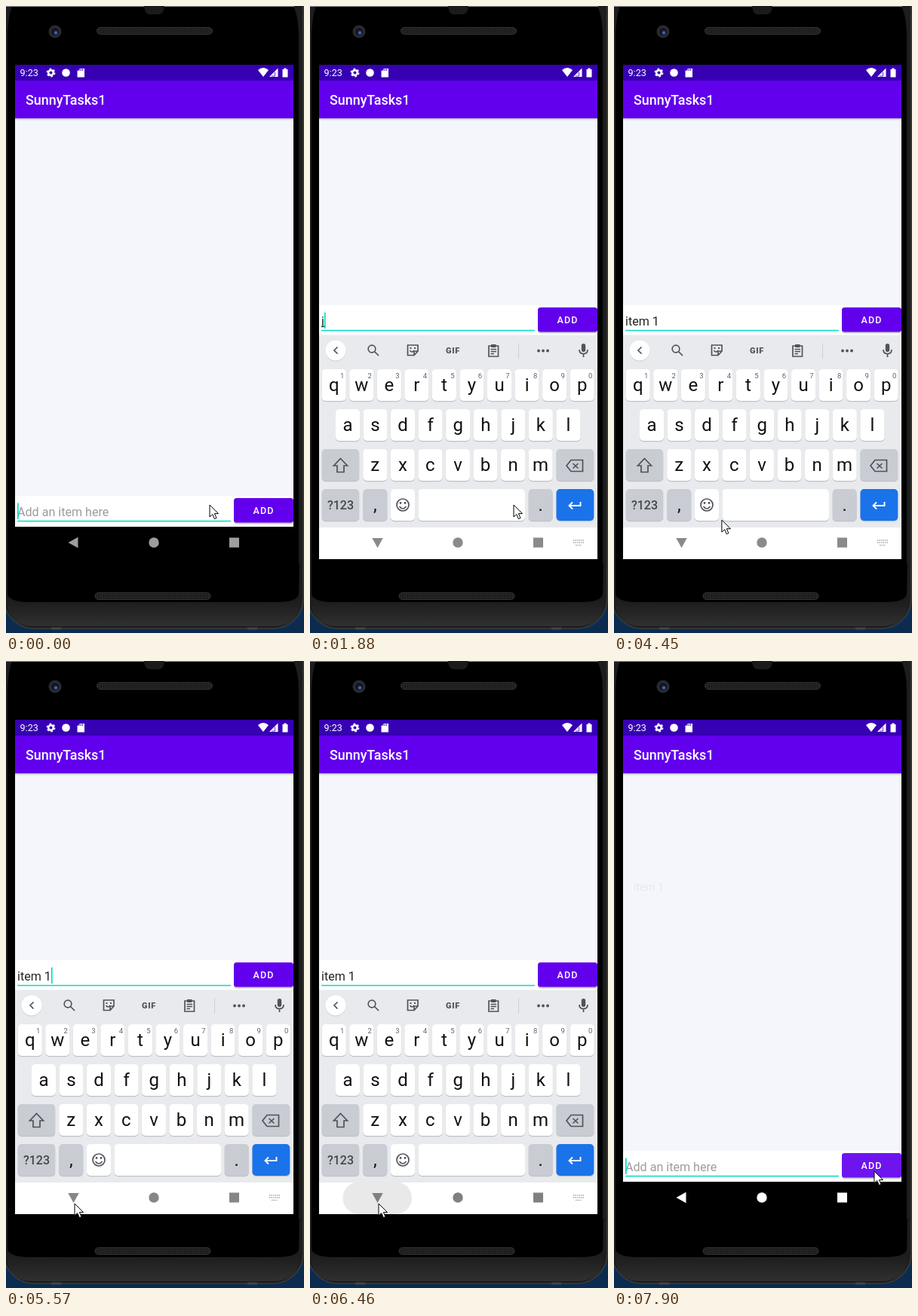
Write an HTML page that moves like this. It is 395 px wide and 832 px high and loops after 8000 ms.

```html
<!DOCTYPE html>
<html lang="en">
<head>
<meta charset="utf-8">
<title>Todo list demo</title>
<style>
  html, body { margin: 0; width: 100%; height: 100%; overflow: hidden; background: #0b2c50; }
  svg { display: block; width: 100vw; height: 100vh; }
  text { font-family: Roboto, "Noto Sans", sans-serif; white-space: pre; }
  .medium { font-weight: 500; }
  .field { font-size: 16.1px; }
  .mid { text-anchor: middle; }
  .line { fill: none; stroke: #505358; stroke-width: 1.7; }
</style>
</head>
<body>
<svg viewBox="0 0 395 832" preserveAspectRatio="none">
  <defs>
    <clipPath id="screen"><rect x="12" y="78" width="369" height="656"/></clipPath>
    <linearGradient id="chin" x2="0" y2="1">
      <stop offset="0" stop-color="#000"/><stop offset=".35" stop-color="#111"/><stop offset="1" stop-color="#303030"/>
    </linearGradient>
    <linearGradient id="barShadow" x2="0" y2="1">
      <stop offset="0" stop-color="#000" stop-opacity=".25"/><stop offset="1" stop-color="#000" stop-opacity="0"/>
    </linearGradient>
    <pattern id="mesh" width="3" height="3" patternUnits="userSpaceOnUse">
      <rect width="3" height="3" fill="#1c1c1c"/><circle cx="1.5" cy="1.5" r=".8" fill="#333"/>
    </pattern>
  </defs>

  <!-- Phone body -->
  <rect x="-3" y="-40" width="397" height="866" rx="40" fill="#1d1d1d" stroke="#3d3d3d" stroke-width="1.5"/>
  <path d="M2 740H389V792Q389 823 352 823H38Q2 823 2 792Z" fill="url(#chin)"/>
  <path d="M2 40Q3 12 8 0H381Q388 15 388 40V780Q386 791 360 791H30Q5 791 2 780Z"/>
  <path d="M0 .5H382" stroke="#8d8d8d"/>
  <path d="M183 0H210Q209 11 203 11H190Q184 11 183 0Z" fill="#1b1b1b"/>
  <path d="M60 826H73M320 826H333" stroke="#444" stroke-width="3"/>
  <g fill="url(#mesh)" stroke="#343434">
    <rect x="120.5" y="28.5" width="153" height="9" rx="4.5"/>
    <rect x="118" y="778.5" width="153" height="9" rx="4.5"/>
  </g>
  <circle cx="65" cy="34" r="8.5" fill="#2b2b2e"/>
  <circle cx="65" cy="34" r="5" fill="#10162c"/>
  <circle cx="66" cy="35.5" r="2.2" fill="#4a5fa5"/>

  <g clip-path="url(#screen)">
    <rect x="12" y="149" width="369" height="542" fill="#f4f6fb"/>
    <text id="listItem" x="26" y="305" font-size="14.35">item 1</text>
    <rect x="12" y="149" width="369" height="3" fill="url(#barShadow)"/>
    <rect x="12" y="78" width="369" height="21" fill="#3700b3"/>
    <rect x="12" y="99" width="369" height="50" fill="#6200ee"/>
    <g fill="#fff">
      <text x="18.5" y="93.3" font-size="12.6">9:23</text>
      <text class="medium" x="26" y="131" font-size="17.9">SunnyTasks1</text>
      <circle cx="59.5" cy="88.5" r="3.3" fill="none" stroke="#fff" stroke-width="2.6"/>
      <circle cx="59.5" cy="88.5" r="5" fill="none" stroke="#fff" stroke-width="1.8" stroke-dasharray="2.6 2.636"/>
      <circle cx="79.5" cy="88.5" r="5.3"/>
      <path d="M98 83H104V94.500H94.500V86.500Z"/>
      <path d="M334 85Q341 79 348 85L341 94Z"/>
      <path d="M360.500 82.500V94H349Z"/>
      <path d="M368.500 82.500H371.500V84H373.500V94.500H366.500V84H368.500Z"/>
    </g>
    <path d="M97 83.500V86M99.300 83.500V86M101.600 83.500V86" stroke="#3700b3"/>
    <path d="M356.500 87.500V93H352" fill="none" stroke="#3700b3" stroke-width=".8"/>

    <!-- Input row, laid out at its resting place -->
    <g id="row">
      <rect x="12" y="650" width="369" height="41" fill="#fff"/>
      <rect id="rowFill" x="12" y="690" width="369" height="254" fill="#fff"/>
      <rect x="15" y="682.800" width="283" height="1.500" fill="#03dac5"/>
      <text id="hint" class="field" x="15" y="676.500" fill="#9c9c9c">Add an item here</text>
      <text id="entry" class="field" x="15" y="676.500" fill="#242424"><tspan id="word"></tspan><tspan id="rest"></tspan></text>
      <rect id="caret" y="659.500" width="1.700" height="21.500" fill="#03dac5"/>
      <rect x="302" y="655" width="79" height="32.500" rx="4" fill="#000" opacity=".2"/>
      <rect x="302" y="653" width="79" height="32.500" rx="3.500" fill="#6200ee"/>
      <rect id="addRipple" x="302" y="653" width="79" height="32.500" rx="3.500" fill="#fff"/>
      <text class="medium" x="327.500" y="674" font-size="12.560" letter-spacing="1.120" fill="#fff">ADD</text>
    </g>
    <rect id="navBlack" x="12" y="691" width="369" height="43"/>

    <g id="keyboard">
      <rect x="12" y="436.500" width="369" height="256" fill="#e8eaed"/>
      <rect x="12" y="692" width="369" height="120" fill="#fff"/>
      <circle cx="34" cy="458" r="13.500" fill="#ccced2"/>
      <circle cx="34" cy="457" r="13.500" fill="#fff"/>
      <path id="chevron" class="line" d="M36.500 452.500L32 457L36.500 461.500"/>
      <g id="tools">
        <circle class="line" cx="82" cy="455" r="4.800"/>
        <path class="line" d="M85.500 458.500L91 464" stroke-width="2"/>
        <path class="line" d="M131 450H143V458L138 463.500H129.500V450H132M143 458H138V463.500"/>
        <path class="line" d="M132.500 457Q135 461 138 457" stroke-width="1.300"/>
        <path d="M132.500 453H134.500V455H132.500ZM138 453H140V455H138Z" fill="#505358"/>
        <text class="mid" x="189.500" y="461" font-size="11" font-weight="900" letter-spacing=".8" fill="#505358">GIF</text>
        <path class="line" d="M237 451H249.500V465H237ZM239.500 455.500H247M239.500 458.500H247M239.500 461.500H244"/>
        <path d="M240 449H246.500V453H240Z" fill="#505358"/>
        <path d="M276.500 447.500V468" stroke="#cbced2"/>
        <g fill="#505358"><circle cx="303" cy="457.500" r="1.900"/><circle cx="309" cy="457.500" r="1.900"/><circle cx="315" cy="457.500" r="1.900"/></g>
      </g>
      <g id="suggestions" font-size="16" fill="#45484d">
        <path d="M141.500 446V468M249.500 446V468" stroke="#c4c7cb"/>
        <text class="mid" x="93" y="463"></text><text class="mid" x="195" y="463"></text><text class="mid" x="297" y="463"></text>
      </g>
      <rect x="359.800" y="448" width="5.400" height="11" rx="2.700" fill="#505358"/>
      <path class="line" d="M357 456Q357 461.500 362.500 461.500T368 456M362.500 461.500V466"/>
      <g id="keys"></g>
      <path class="line" d="M40.500 600.500L49.500 610H45V618.500H36V610H31.500Z"/>
      <path class="line" d="M346 602.500H361.500V617.500H346L340 610ZM348.500 607L355.500 613.500M355.500 607L348.500 613.500"/>
      <circle class="line" cx="123" cy="662" r="8"/>
      <path class="line" d="M118.500 664Q123 670 127.500 664"/>
      <circle cx="120" cy="659.500" r="1.400" fill="#505358"/><circle cx="126" cy="659.500" r="1.400" fill="#505358"/>
      <path d="M358.500 658V663H343.500M348 658.500L343.500 663L348 667.500" fill="none" stroke="#fff" stroke-width="1.900"/>
    </g>

    <rect id="backRipple" x="43.500" y="691" width="91.500" height="43" rx="21.500" fill="#e8e8e8"/>
    <g id="nav">
      <path id="back" d="M82.500 712L95.500 704.800V719.200Z"/>
      <circle cx="196" cy="712" r="6.700"/>
      <rect x="296" y="705.500" width="13" height="13"/>
    </g>
    <path id="switcher" d="M349 709H363M349 712H363M352 715.500H360" stroke="#aaa" stroke-width="1.500" stroke-dasharray="1.500 1"/>
  </g>
  <path id="mouse" d="M0 0V16L3.700 12.500L6.400 18.600L9 17.500L6.400 11.600H11.500Z" fill="#fff" stroke="#000"/>
</svg>

<script>
const LOOP = 8000;
const el = id => document.getElementById(id);
const set = (id, name, value) => el(id).setAttribute(name, value);
const fade = (id, opacity) => set(id, "opacity", opacity);
const progress = (t, start, end) => Math.min(1, Math.max(0, (t - start) / (end - start)));

// Keyframes are [time, ...values]; values between them are linear.
function track(t, frames) {
  const i = frames.findIndex(f => f[0] > t);
  if (i < 0) return frames.at(-1).slice(1);
  if (i === 0) return frames[0].slice(1);
  const [a, b] = [frames[i - 1], frames[i]];
  const p = progress(t, a[0], b[0]);
  return a.slice(1).map((v, k) => v + (b[k + 1] - v) * p);
}

// Latest [time, value] whose time has come.
const latest = (t, steps) => steps.filter(s => s[0] <= t).at(-1)[1];

function key(x, y, width, label = "", fill = "#fff", size = 24, corner = "") {
  const box = (dy, color) => `<rect x="${x}" y="${y + dy}" width="${width}" height="42" rx="5" fill="${color}"/>`;
  const ink = size === 24 ? "#111" : "#44474c";
  return box(1.2, "#bfc2c7") + box(0, fill) +
    `<text class="mid" x="${x + width / 2}" y="${y + (size === 24 ? 28.5 : 27)}" font-size="${size}" fill="${ink}"${size < 24 ? ' font-weight="500"' : ""}>${label}</text>` +
    `<text class="mid" x="${x + 27}" y="${y + 11.5}" font-size="9.5" fill="#5f6368">${corner}</text>`;
}

function buildKeys() {
  const pitch = 36.55, gray = "#c9ccd3";
  const letters = (word, x, y, numbered) => [...word].map((c, i) =>
    key(x + i * pitch, y, 32, c, "#fff", 24, numbered ? (i + 1) % 10 : "")).join("");
  el("keys").innerHTML =
    letters("qwertyuiop", 15.7, 482, true) + letters("asdfghjkl", 34, 535) + letters("zxcvbnm", 70.3, 588) +
    key(15.7, 588, 49.5, "", gray) + key(326.5, 588, 49.8, "", gray) +
    key(15.7, 641, 49.5, "?123", gray, 16) + key(70.3, 641, 32, ",", gray) + key(107, 641, 32) +
    key(143.5, 641, 141.5) + key(289.7, 641, 32, ".", gray) + key(326.5, 641, 49.8, "", "#1a73e8");
}

const typed = [[0, ""], [1880, "i"], [2320, "it"], [2630, "ite"], [2940, "item"], [3350, "item "], [3620, "item 1"], [7630, ""]];
const offered = [[0, ""], [2160, "I,it,in"], [2480, "it,it's,its"], [2790, "ite,item,it's"], [3480, "is,and,number"], [3900, ""]];
const mousePath = [
  [4100, 270, 662], [4450, 143, 682], [4850, 94, 731], [5200, 91, 720], [6500, 91, 720],
  [6990, 302, 672], [7110, 309, 675], [7350, 345, 677]
];
const navGray = [[430, 158], [690, 198], [1110, 138], [5200, 138], [6200, 128], [6550, 128], [6750, 255]];

function caretVisible(t) {
  if (t >= 1880 && t < 3570) return true;
  const phase = t < 1880 ? t - 10 : t - 3570;
  return Math.floor(phase / 500) % 2 === 0 || t < 10;
}

function drawEntry(t) {
  const value = latest(t, typed);
  const composing = t >= 1880 && t < 3480;
  el("word").textContent = value.trimEnd();
  el("rest").textContent = value.slice(value.trimEnd().length);
  set("word", "text-decoration", composing ? "underline" : "none");
  fade("hint", value ? 0 : 1);
  fade("caret", caretVisible(t) ? 1 : 0);
  set("caret", "x", 15 + (value ? el("entry").getComputedTextLength() : 0));
}

function drawKeyboard(t) {
  const shown = t < 6000 ? 1 - (1 - progress(t, 430, 770)) ** 2 : 1 - progress(t, 6550, 6750) ** 2;
  const resized = t >= 430 && t < 6550;
  set("row", "transform", `translate(0 ${resized ? -253 : 0})`);
  fade("rowFill", resized ? 1 : 0);
  set("keyboard", "transform", `translate(0 ${72 * (1 - shown)})`);
  fade("keyboard", Math.min(1, shown * 1.3));

  const words = latest(t, offered);
  fade("tools", words ? 0 : 1);
  fade("suggestions", words ? 1 : 0);
  set("chevron", "transform", words ? "rotate(180 34 457)" : "");
  const labels = words.split(",");
  el("suggestions").querySelectorAll("text").forEach((node, i) => node.textContent = labels[i] || "");
  return shown;
}

function drawNav(t, shown) {
  const gray = Math.round(track(t, navGray)[0]);
  set("nav", "fill", `rgb(${gray},${gray},${gray})`);
  const turn = progress(t, 810, 1050) - progress(t, 6550, 6750);
  set("back", "transform", `rotate(${-90 * turn} 89.5 712)`);
  fade("switcher", shown * (.5 + .5 * progress(t, 690, 1110)));
  fade("backRipple", progress(t, 6070, 6250) * (1 - progress(t, 6450, 6650)));
}

function draw(t) {
  drawEntry(t);
  drawNav(t, drawKeyboard(t));
  fade("addRipple", .08 * progress(t, 7600, 7700));
  fade("listItem", .05 * progress(t, 7780, 7900));
  set("mouse", "transform", `translate(${track(t, mousePath).join(" ")})`);
}

function tick() {
  draw(performance.now() % LOOP);
  requestAnimationFrame(tick);
}

buildKeys();
tick();
</script>
</body>
</html>
```
